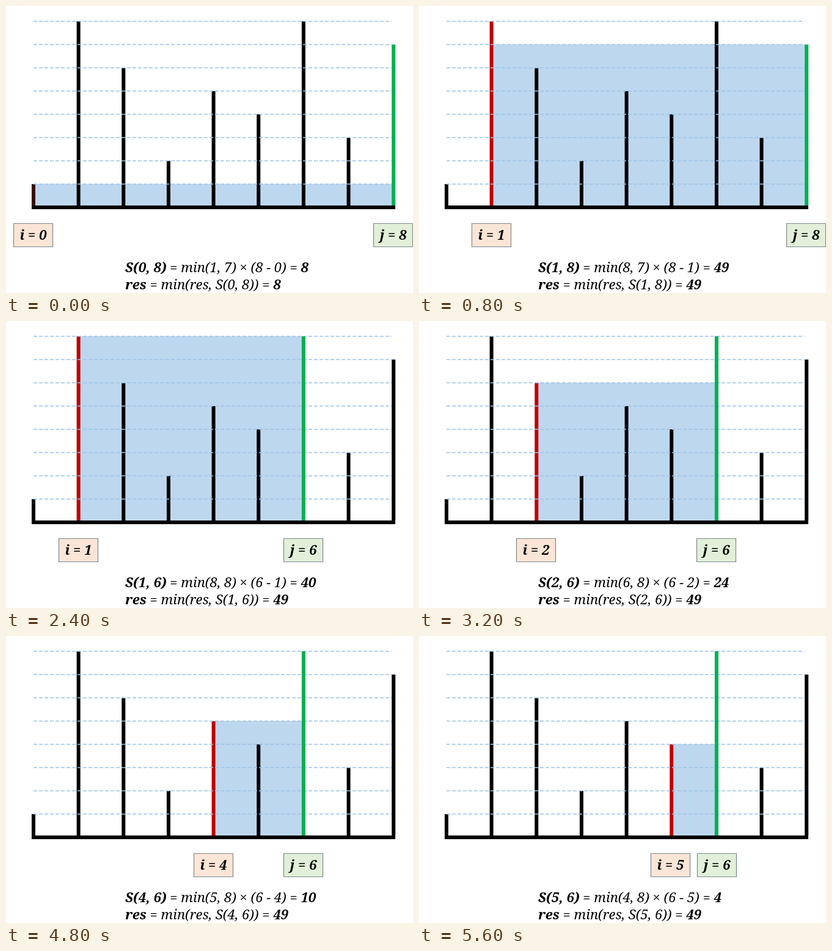
These frames come from a looping animation (666 by 469 pixels, 6.4 s). An HTML page with a canvas:

```html
<!DOCTYPE html>
<html lang="en">
<head>
<meta charset="utf-8">
<title>Two pointers</title>
<style>
html, body { margin: 0; width: 100%; height: 100%; overflow: hidden; background: #fff; }
canvas { display: block; }
</style>
</head>
<body>
<canvas id="stage" width="666" height="469"></canvas>
<script>
const ctx = document.getElementById('stage').getContext('2d');
const heights = [1, 8, 6, 2, 5, 4, 8, 3, 7];
const STEP_MS = 800;
const FLOOR = 326;
const SERIF = '"Noto Serif", serif';
const REGULAR = `italic 22px ${SERIF}`;
const BOLD = `italic bold 22px ${SERIF}`;

const barX = k => 45 + 73.65 * k;
const levelY = h => 329 - 38 * h;

// Both pointers close in; the shorter bar moves, the left one on a tie.
function solve() {
  const steps = [];
  let i = 0, j = heights.length - 1, best = 0;
  while (i < j) {
    const area = Math.min(heights[i], heights[j]) * (j - i);
    best = Math.max(best, area);
    steps.push({ i, j, area, best });
    if (heights[i] <= heights[j]) i++; else j--;
  }
  return steps;
}
const steps = solve();

function rect(x, y, w, h, color) {
  ctx.fillStyle = color;
  ctx.fillRect(x, y, w, h);
}

function drawBar(k, color) {
  const top = levelY(heights[k]);
  rect(barX(k) - 3, top, 6, FLOOR - top, color);
}

function drawGrid() {
  ctx.strokeStyle = '#9dc3e6';
  ctx.lineWidth = 1.5;
  ctx.setLineDash([6, 3]);
  for (let h = 1; h <= 8; h++) {
    ctx.beginPath();
    ctx.moveTo(45, levelY(h));
    ctx.lineTo(631, levelY(h));
    ctx.stroke();
  }
  ctx.setLineDash([]);
}

function drawLabel(text, center, fill) {
  const left = Math.round(center - 32) - 0.5;
  ctx.fillStyle = fill;
  ctx.strokeStyle = '#7c8a8a';
  ctx.lineWidth = 1.2;
  ctx.beginPath();
  ctx.rect(left, 355.5, 64, 38);
  ctx.fill();
  ctx.stroke();
  ctx.fillStyle = '#000';
  ctx.font = BOLD;
  ctx.textAlign = 'center';
  ctx.fillText(text, left + 32, 382);
}

function drawFormula(parts, y) {
  let x = 195;
  ctx.fillStyle = '#000';
  ctx.textAlign = 'left';
  parts.forEach((part, n) => {
    ctx.font = n === 1 ? REGULAR : BOLD;
    ctx.fillText(part, x, y);
    x += ctx.measureText(part).width;
  });
}

function drawStep({ i, j, area, best }) {
  const [a, b] = [heights[i], heights[j]];
  const top = levelY(Math.min(a, b));
  rect(0, 0, 666, 469, '#fff');
  rect(barX(i), top, barX(j) - barX(i), FLOOR - top, '#bdd7ee');

  heights.forEach((_, k) => { if (k !== i && k !== j) drawBar(k, '#000'); });
  drawBar(i, i === 0 ? '#3a0606' : '#c00000');
  drawGrid();
  drawBar(j, '#00b050');
  rect(42, FLOOR, 595, 6, '#000');

  const nudge = j - i === 1 ? 1 : 0;
  drawLabel(`i = ${i}`, barX(i) - nudge, '#fbe5d6');
  drawLabel(`j = ${j}`, barX(j) + nudge, '#e2f0d9');

  const pair = `S(${i}, ${j})`;
  drawFormula([pair, ` = min(${a}, ${b}) × (${j} - ${i}) = `, `${area}`], 435);
  drawFormula(['res', ` = min(res, ${pair}) = `, `${best}`], 463);
}

function tick(now) {
  drawStep(steps[Math.floor(now / STEP_MS) % steps.length]);
  requestAnimationFrame(tick);
}
drawStep(steps[0]);
requestAnimationFrame(tick);
</script>
</body>
</html>
```
